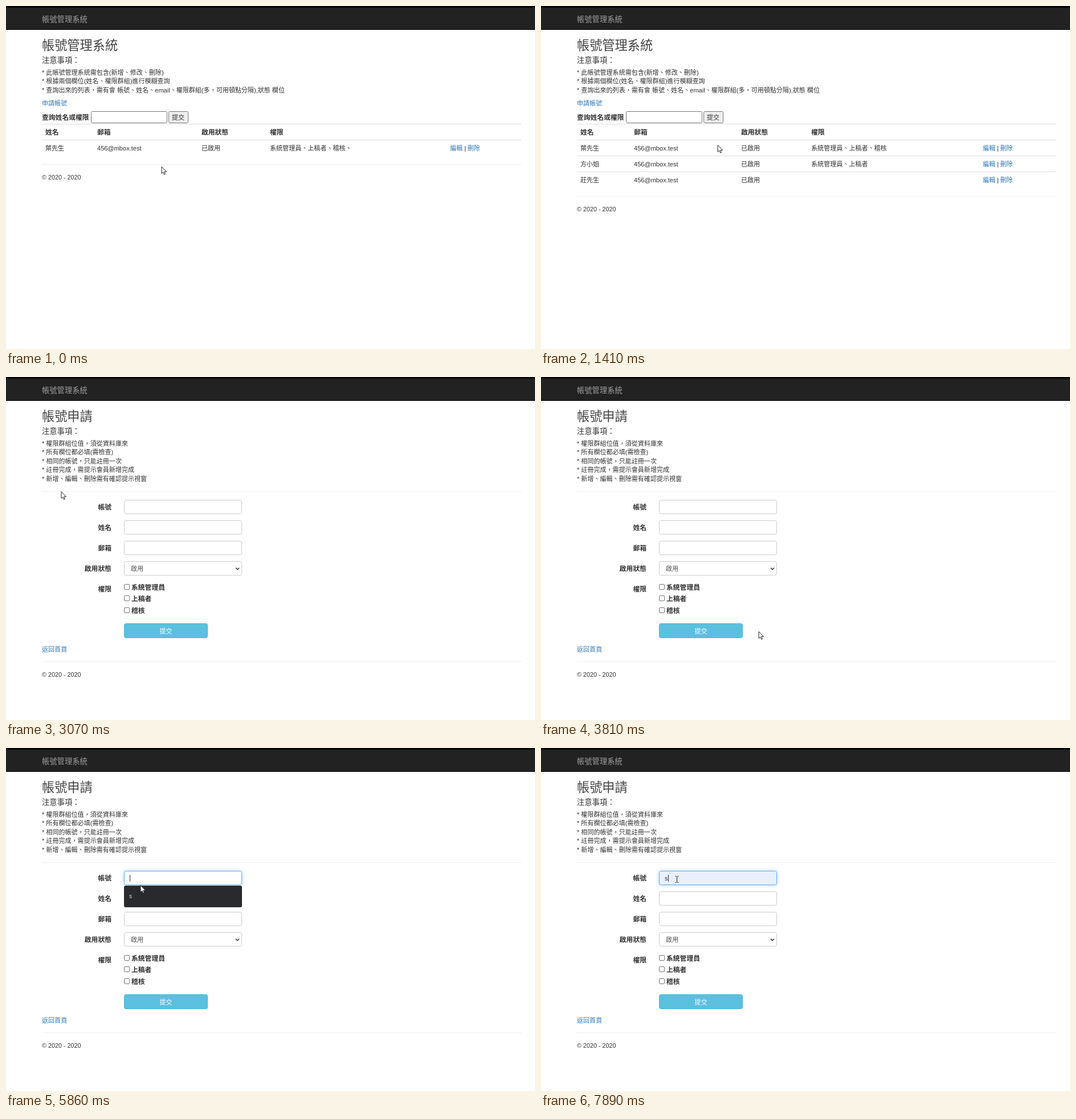
An HTML page with a canvas that plays this animation: 928 by 603 pixels, repeating every 7.99 s.

```html
<!DOCTYPE html>
<html lang="zh-Hant">
<head>
<meta charset="utf-8">
<title>帳號管理系統</title>
<style>
  html, body { margin: 0; width: 928px; height: 603px; overflow: hidden; background: #fff; }
  canvas { display: block; }
</style>
</head>
<body>
<canvas id="stage" width="928" height="603"></canvas>
<script>
const ctx = document.getElementById('stage').getContext('2d');
const LOOP = 7990, STEP = 92, BLINK = 550;
const FAMILY = '"Liberation Sans", "Noto Sans CJK TC", "Noto Sans CJK JP", sans-serif';
const INK = '#333', LINK = '#337ab7', LINK_HOVER = '#23527c', BORDER = '#767676';
const SIZE = 11.05;

const RESULT = 1200, FORM = 2890, FOCUS = 5440, PREVIEW = 5950, FILLED = 6500;

const SEARCH = [149, 185, 134, 21], SEARCH_BUTTON = [285, 185, 35, 21];
const APPLY_LINK = [63, 163, 45, 15], SUBMIT = [207, 433, 147, 26];
const field = i => [207, 216 + 36 * i, 207, 25];

const HOME = { x: 273, y: 282 };
const MOVES = [
  { from: 0, to: 570, x: 150, y: 197 },
  { from: 750, to: RESULT, x: 302, y: 196 },
  { from: RESULT, to: 1400, x: 310, y: 244 },
  { from: 1450, to: 2050, x: 93, y: 173 },
  { from: 2800, to: 2980, x: 97, y: 201 },
  { from: 3090, to: 3710, x: 320, y: 451 },
  { from: 3710, to: 3810, x: 382, y: 447 },
  { from: 4000, to: 4450, x: 405, y: 428 },
  { from: 4910, to: FOCUS, x: 236, y: 232 },
  { from: 5560, to: 5760, x: 236, y: 241 },
  { from: 5870, to: 6120, x: 236, y: 257 },
  { from: FILLED, to: 7060, x: 270, y: 443 },
  { from: 7520, to: 7890, x: 238, y: 231 }
];

// The pointer eases through each move, refreshed about every STEP ms.
function pointerAt(t) {
  let { x, y } = HOME;
  for (const move of MOVES) {
    if (t < move.from) break;
    const steps = Math.round((move.to - move.from) / STEP);
    const raw = Math.floor(steps * (t - move.from) / (move.to - move.from) + 0.01) / steps;
    const p = Math.min(1, raw);
    const ease = p * p * (3 - 2 * p);
    x += (move.x - x) * ease;
    y += (move.y - y) * ease;
  }
  return { x: Math.round(x), y: Math.round(y) };
}

function inside(p, [x, y, w, h]) {
  return p.x >= x && p.x <= x + w && p.y >= y && p.y <= y + h;
}

// cy is the vertical middle of the line of text.
function text(str, x, cy, { size = SIZE, color = INK, weight = 400, align = 'left' } = {}) {
  ctx.font = `${weight} ${size}px ${FAMILY}`;
  ctx.fillStyle = color;
  ctx.textAlign = align;
  ctx.fillText(str, x, cy + size * 0.38);
}

function bold(str, x, cy, align) {
  text(str, x, cy, { size: 11.8, weight: 700, align });
}

function rect(x, y, w, h, color) {
  ctx.fillStyle = color;
  ctx.fillRect(x, y, w, h);
}

function box([x, y, w, h], r, fill, stroke) {
  ctx.beginPath();
  ctx.roundRect(x + 0.5, y + 0.5, w - 1, h - 1, r);
  ctx.fillStyle = fill;
  ctx.fill();
  ctx.shadowColor = 'transparent';
  ctx.strokeStyle = stroke;
  ctx.lineWidth = 1;
  ctx.stroke();
}

function rule(y, color) {
  rect(63, y, 841, 1, color);
}

function header(title, notes) {
  rect(0, 0, 928, 41, '#222');
  rect(0, 0, 928, 3, '#040404');
  rect(0, 41, 928, 1, '#080808');
  text('帳號管理系統', 63, 22.5, { size: 13.3, color: '#9d9d9d' });
  text(title, 63, 68.5, { size: 22.2, weight: 300, color: '#444' });
  text('注意事項：', 63, 95, { size: 13.3 });
  notes.forEach((note, i) => text('* ' + note, 63, 116.5 + 15.5 * i));
}

function footer(y) {
  rule(y, '#eee');
  text('© 2020 - 2020', 63, y + 23, { size: 10.8 });
}

function link(str, x, cy, hover) {
  text(str, x, cy, { color: hover ? LINK_HOVER : LINK });
  if (hover) rect(x, cy + 6, str.length * SIZE, 1, LINK_HOVER);
}

function drawList(cols, rows, pointer) {
  header('帳號管理系統', [
    '此帳號管理系統需包含(新增、修改、刪除)',
    '根據兩個欄位(姓名、權限群組)進行模糊查詢',
    '查詢出來的列表，需有會 帳號、姓名、email、權限群組(多，可用頓點分隔),狀態 欄位'
  ]);
  const onLink = inside(pointer, APPLY_LINK), onButton = inside(pointer, SEARCH_BUTTON);
  link('申請帳號', 63, 170.5, onLink);
  bold('查詢姓名或權限', 63, 195.5);
  box(SEARCH, 2, '#fff', BORDER);
  box(SEARCH_BUTTON, 2, onButton ? '#e5e5e5' : '#efefef', BORDER);
  text('提交', 291, 195.5);

  rule(207, '#ddd');
  ['姓名', '郵箱', '啟用狀態', '權限'].forEach((name, i) => bold(name, cols[i], 221.5));
  rows.forEach(([name, roles], i) => {
    const y = 250 + 28 * i, x = cols[4];
    rule(y - 15, '#ddd');
    [name, '456@mbox.test', '已啟用', roles].forEach((cell, n) => text(cell, cols[n], y));
    link('編輯', x, y);
    text('|', x + 25, y);
    link('刪除', x + 30.5, y);
  });
  footer(250 + 28 * rows.length);

  if (onLink) return 'hand';
  return inside(pointer, SEARCH) ? 'beam' : 'arrow';
}

function drawField(i, focused, filled) {
  if (focused) {
    ctx.shadowColor = 'rgba(102,175,233,.7)';
    ctx.shadowBlur = 6;
  }
  box(field(i), 3, filled ? '#e8f0fe' : '#fff', focused ? '#66afe9' : '#ccc');
}

function drawSuggestion(hover) {
  ctx.beginPath();
  ctx.roundRect(207, 242, 207, 38, 3);
  ctx.fillStyle = '#292a2d';
  ctx.fill();
  if (hover) rect(207, 248, 207, 26, '#3f4043');
  text('s', 216, 260.5, { size: 10, color: '#dcdcdc' });
}

function drawCaret(t) {
  const filled = t >= FILLED;
  const since = t - (filled ? FILLED : FOCUS);
  const hidden = since < 0 || (t >= PREVIEW && !filled);
  if (!hidden && since % (2 * BLINK) < BLINK) rect(filled ? 223 : 217, 223, 1, 12, INK);
}

function drawForm(t, pointer) {
  header('帳號申請', [
    '權限群組位值，須從資料庫來', '所有欄位都必填(需檢查)', '相同的帳號，只能註冊一次',
    '註冊完成，需提示會員新增完成', '新增、編輯、刪除需有確認提示視窗'
  ]);
  rule(201, '#eee');
  const focused = t >= FOCUS, preview = t >= PREVIEW, open = focused && t < FILLED;

  ['帳號', '姓名', '郵箱', '啟用狀態', '權限'].forEach((name, i) => {
    bold(name, 185, 229 + 36 * i, 'right');
    if (i < 4) drawField(i, i === 0 && focused, i === 0 && preview);
  });
  if (preview) text('s', 217, 229);
  drawCaret(t);

  text('啟用', 219, 337, { color: '#555' });
  ctx.lineWidth = 1.5;
  ctx.strokeStyle = INK;
  ctx.stroke(new Path2D('M403 335.5L406 338.5 409 335.5'));

  ['系統管理員', '上稿者', '稽核'].forEach((role, i) => {
    const y = 369.5 + 20.5 * i;
    box([207, Math.floor(y - 5.5), 10, 10], 1.5, '#fff', BORDER);
    bold(role, 220, y);
  });

  const onButton = inside(pointer, SUBMIT);
  box(SUBMIT, 3, onButton ? '#31b0d5' : '#5bc0de', onButton ? '#269abc' : '#46b8da');
  text('提交', 280.5, 447, { color: '#fff', align: 'center' });
  link('返回首頁', 63, 478.5);
  footer(500);
  if (open) drawSuggestion(preview);

  if (onButton) return 'hand';
  if (open && pointer.y > 240) return 'arrow';
  return [0, 1, 2].some(i => inside(pointer, field(i))) ? 'beam' : 'arrow';
}

const SHAPES = {
  arrow: new Path2D('M0 .5V12.5L2.7 10 4.6 14.2 6.5 13.4 4.7 9.3H8.5Z'),
  hand: new Path2D('M0 1Q1-.8 2 1V5Q5.5 4 8 7V10.5L6.5 14H.5L-3 9Q-3.4 7.4-1.6 7.8L0 9Z'),
  beam: new Path2D('M-2.5-5.5H-.5L.5-4.5 1.5-5.5H3.5M.5-4.5V4.5M-2.5 5.5H-.5L.5 4.5 1.5 5.5H3.5')
};

function drawPointer(kind, { x, y }) {
  ctx.save();
  ctx.translate(x, y);
  ctx.lineWidth = 1;
  ctx.lineJoin = 'round';
  ctx.strokeStyle = '#222';
  ctx.fillStyle = '#fff';
  if (kind !== 'beam') ctx.fill(SHAPES[kind]);
  ctx.stroke(SHAPES[kind]);
  ctx.restore();
}

function drawPage(t, pointer) {
  if (t >= FORM) return drawForm(t, pointer);
  if (t < RESULT) {
    return drawList([69, 160, 343, 463, 779], [['葉先生', '系統管理員、上稿者、稽核、']], pointer);
  }
  return drawList([69, 163, 351, 474, 775], [
    ['葉先生', '系統管理員、上稿者、稽核'], ['方小姐', '系統管理員、上稿者'], ['莊先生', '']
  ], pointer);
}

function draw(t) {
  const pointer = pointerAt(t);
  rect(0, 0, 928, 603, '#fff');
  drawPointer(drawPage(t, pointer), pointer);
}

const begin = performance.now();
function tick() {
  draw((performance.now() - begin) % LOOP);
  requestAnimationFrame(tick);
}
tick();
</script>
</body>
</html>
```
